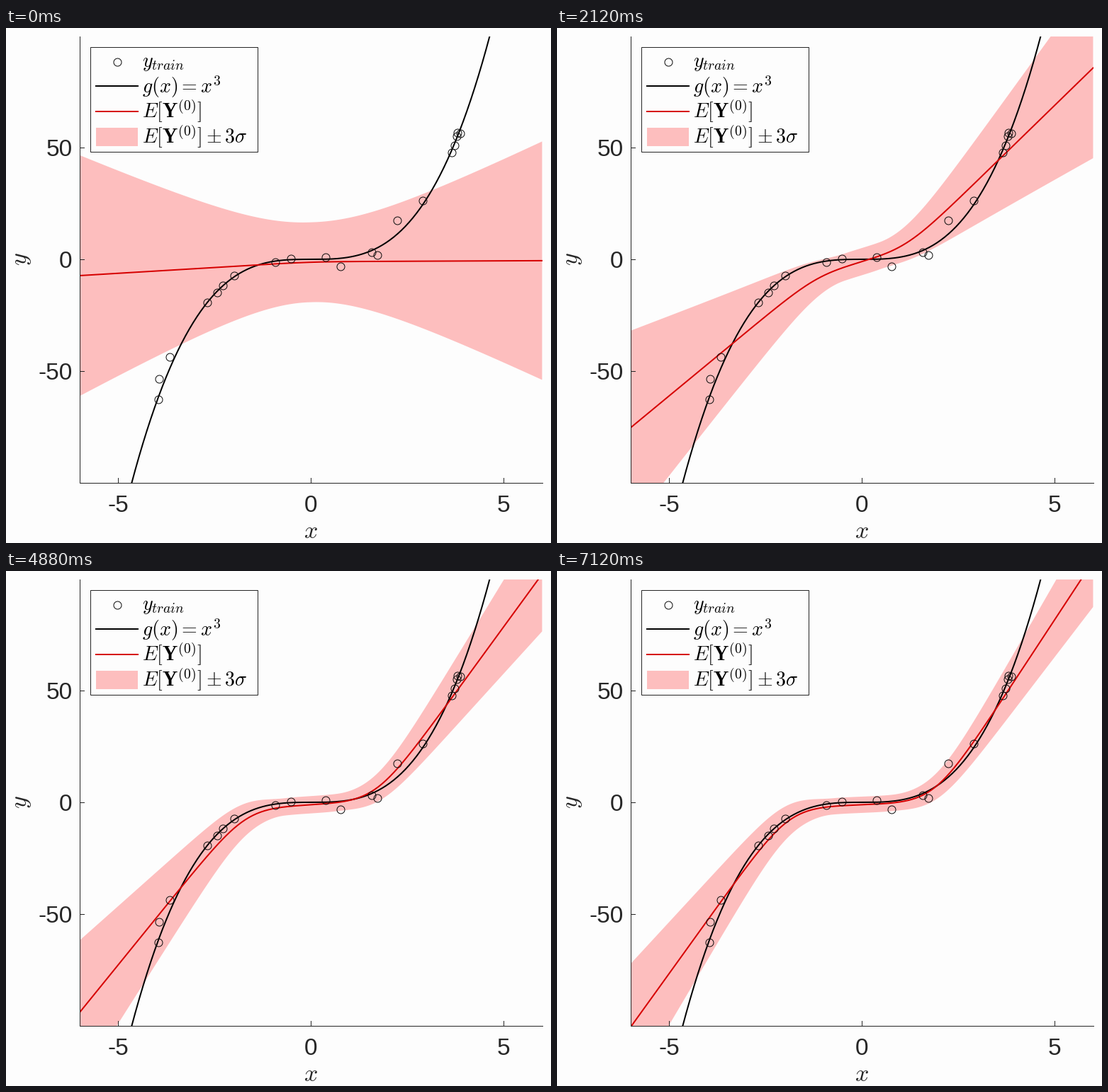
A matplotlib script for the animation above (7.22 s loop, 769 by 728 pixels).

```python
import numpy as np
import matplotlib.pyplot as plt
from matplotlib.animation import FuncAnimation
from matplotlib.patches import Polygon, Rectangle

W, H, DPI = 769, 728, 100
TICK, LOOP = 20, 7220
PT = 72 / DPI
INK, PAPER, PINK, RED = "#262626", "#fdfdfd", "#fdbebe", "#d60000"
LEFT, RIGHT, TOP, BOTTOM = 103.5, 756.5, 11.5, 642.5
EPOCH, LAST_STEP = 20, 152

plt.rcParams["mathtext.fontset"] = "cm"
plt.rcParams["font.family"] = "Liberation Sans"


def px(x):
    return 430 + 54.4 * np.asarray(x)


def py(y):
    return 327 - 3.155 * np.asarray(y)


X = np.linspace(-6, 6, 241)


def step_at(ms):
    """Three training steps every 140 ms, held 20, 100 and 20 ms."""
    block, rest = divmod(ms, 140)
    return min(3 * block + (rest >= 20) + (rest >= 120), LAST_STEP)


def settle(epoch, start, mid, end):
    """Quick move from start to mid, then a slow approach to end."""
    return (end + (mid - end) * np.exp(-0.32 * epoch)
            + (start - mid) * np.exp(-5 * epoch))


def bend(x, at, soft=0.38):
    """Smooth hinge: 0 before `at`, 1 at x = 6."""
    return soft * np.logaddexp(0, (x - at) / soft) / (6 - at)


def fit(epoch):
    """Mean and 3-sigma half-width over X."""
    left = settle(epoch, -7.3, -41.8, -106.5)
    right = settle(epoch, -0.6, 56.1, 113)
    knee = settle(epoch, 0.1, 0.1, 2.05)
    share = min(1, 0.02 + np.exp(-0.95 * (epoch - 1)))
    slope, mid = share * (right - left) / 12, -1.1
    mean = (mid + slope * X
            + (right - mid - 6 * slope) * bend(X, knee)
            + (left - mid + 6 * slope) * bend(-X, knee))

    waist = 3.6 + 14.3 * np.exp(-0.76 * epoch)
    end = np.where(X < 0, settle(epoch, 54, 63.6, 25), settle(epoch, 53.4, 67, 16))
    flat = 0.4 * knee
    reach = np.maximum(np.abs(X) - flat, 0) / (6 - flat)
    return mean, np.sqrt(waist**2 + (end**2 - waist**2) * reach**2)


fig = plt.figure(figsize=(W / DPI, H / DPI), dpi=DPI, facecolor=PAPER)
ax = fig.add_axes([0, 0, 1, 1])
ax.set(xlim=(0, W), ylim=(H, 0))
ax.axis("off")
clip = Rectangle((LEFT, TOP), RIGHT - LEFT, BOTTOM - TOP, transform=ax.transData)


def line(xs, ys, color=INK, lw=1.0, z=4):
    return ax.plot(xs, ys, color=color, lw=lw * PT, zorder=z)[0]


def label(x, y, s, size, color=INK, **kw):
    kw.setdefault("va", "baseline")
    ax.text(x, y, s, fontsize=size * PT, color=color, zorder=8, **kw)


def rings(xs, ys, z):
    ax.plot(xs, ys, "o", ms=11 * PT, mfc="none", mec="#0c0c0c", mew=PT, zorder=z)


# curves
band = ax.add_patch(Polygon(np.zeros((3, 2)), fc=PINK, ec="none", zorder=1))
cubic = line(px(X), py(X**3), "black", 2, 2)
mean_line = line([], [], RED, 2, 3)
for part in (band, cubic, mean_line):
    part.set_clip_path(clip)

# noisy samples of the cubic
sample_x = np.array([-3.95, -3.93, -3.65, -2.69, -2.43, -2.28, -1.98, -0.92, -0.52, 0.38,
                     0.77, 1.58, 1.72, 2.24, 2.9, 3.66, 3.73, 3.78, 3.805, 3.87])
noise = np.array([-1, 7, 5, 0, -0.7, 0, 0.4, -0.4, 0.5, 0.9,
                  -3.6, -0.8, -3.3, 6.3, 1.9, -1.2, -0.9, 1.2, 1.8, -1.7])
rings(px(sample_x), py(sample_x**3 + noise), 4)

# axes
line([LEFT, LEFT, RIGHT], [TOP, BOTTOM, BOTTOM])
for k in (-1, 0, 1):
    x, y = px(5 * k), py(50 * k)
    line([x, x], [BOTTOM, BOTTOM - 6.5])
    line([LEFT, LEFT + 6.5], [y, y])
    label(x, 684, str(5 * k), 33.5, ha="center")
    label(93.5, y + 12, str(50 * k), 33.5, ha="right")
label(430, 721, "$x$", 34, ha="center")
label(22.5, 326.5, "$y$", 34, ha="center", va="center", rotation=90)

# legend
EXPECT = r"E[\mathbf{Y}^{\mathtt{(0)}}]"
ax.add_patch(Rectangle((118.5, 26.5), 236, 148, fc=PAPER, ec=INK, lw=PT, zorder=5))
ax.add_patch(Rectangle((127, 141), 59, 26, fc=PINK, ec="none", zorder=6))
rings([156.5], [48], 6)
line([127, 186], [82, 82], "black", 2, 6)
line([127, 186], [118, 118], RED, 2, 6)
for row, s in enumerate(["$y_{train}$", "$g(x) = x^3$",
                         f"${EXPECT}$", rf"${EXPECT} \pm 3\sigma$"]):
    label(191.5, 55 + 36 * row, s, 28, "black")


def draw(i):
    mean, half = fit(step_at(i * TICK) / EPOCH)
    xs = px(X)
    mean_line.set_data(xs, py(mean))
    band.set_xy(np.column_stack([np.append(xs, xs[::-1]),
                                 py(np.append(mean + half, (mean - half)[::-1]))]))
    return band, mean_line


anim = FuncAnimation(fig, draw, frames=LOOP // TICK, interval=TICK,
                     repeat=True, repeat_delay=0, blit=False)
plt.show()
```
